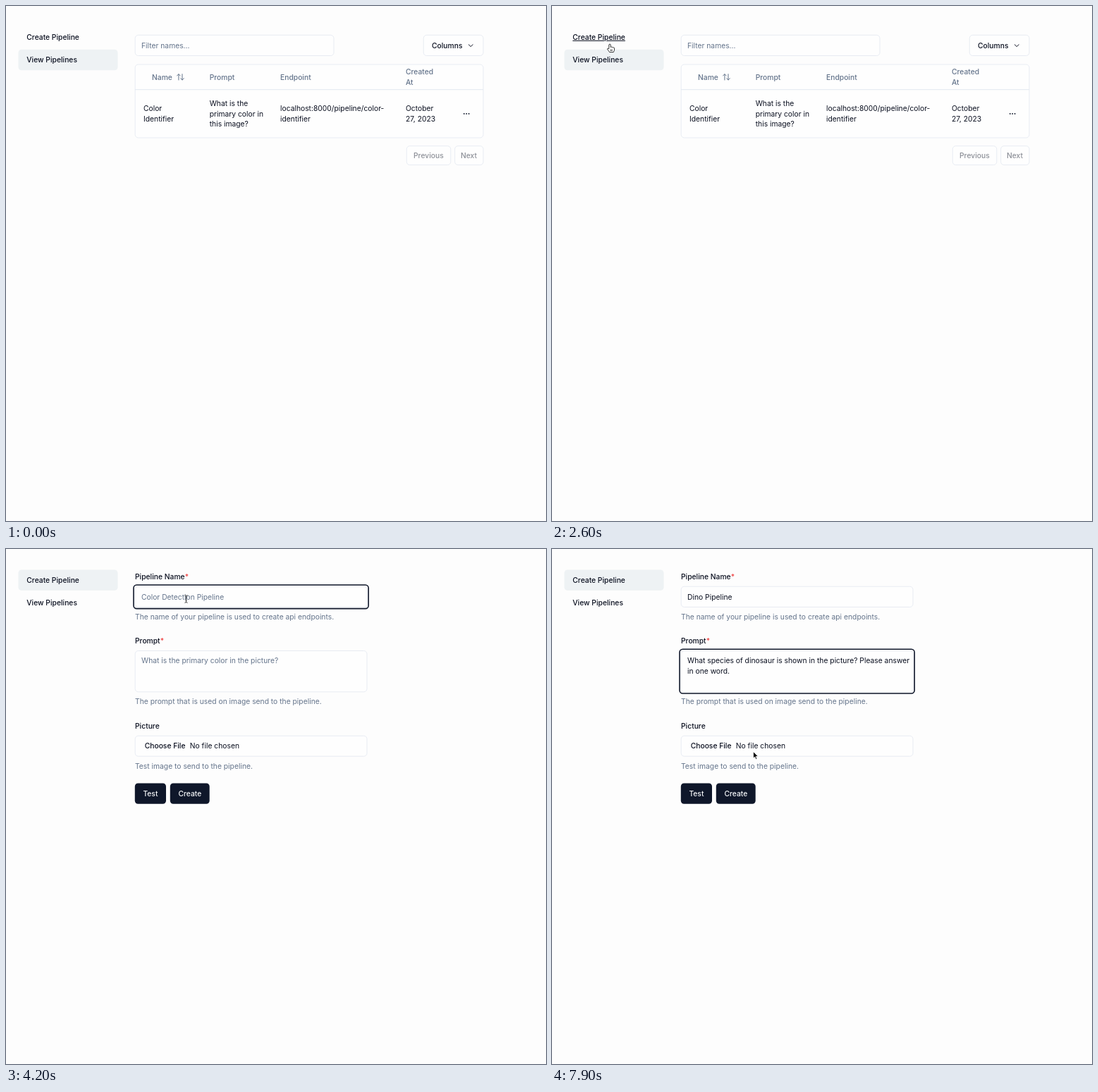
Animation, 766 px wide and 731 px high, one loop 8000 ms. Source, as an HTML page:

```html
<!DOCTYPE html>
<html lang="en">
<head>
<meta charset="utf-8">
<title>Pipelines</title>
<style>
html, body { margin: 0; width: 100%; height: 100%; overflow: hidden; background: #fdfdfd; }
svg { display: block; width: 766px; height: 731px; }
text { font: 400 10.3px Inter, sans-serif; fill: #0b1020; white-space: pre; }
.medium { font-weight: 500; }
.muted { fill: #64748b; }
.faded { fill: #8d9098; }
.light { fill: #f8fafc; }
.star { fill: #ef4444; }
.box { fill: #fefefe; stroke: #e2e8f0; stroke-width: .8; }
.dark { fill: #0f172a; }
.active { fill: #eef2f4; }
.ring { fill: none; stroke: #0f172a; stroke-width: 1.6; }
.icon { fill: none; stroke-width: 1; stroke-linecap: round; stroke-linejoin: round; }
</style>
</head>
<body>
<svg viewBox="0 0 766 731">
  <g id="nav"></g>
  <g id="list"></g>
  <g id="form"></g>
  <path id="caret" stroke="#0b1020" stroke-width=".9"/>
  <g id="cursor">
    <path id="arrow" d="M0 0V9.6L2.2 7.6L3.7 11L5.4 10.3L3.9 7H6.9Z" fill="#111" stroke="#fff" stroke-width=".8"/>
    <path id="hand" d="M-1.2 .8Q0 -.8 1.2 .8V4.4Q2.4 3.4 3.2 4.7Q4.4 3.9 5.1 5.1Q6.4 4.6 6.5 6.2V8Q6.4 9.6 5.2 11.6H-.4Q-1.6 9.5 -3.6 7.2Q-3.7 5.6 -1.2 6.6ZM1.4 7.6V10M3.1 7.6V10" fill="#fff" stroke="#222" stroke-width=".9" stroke-linejoin="round"/>
    <path id="beam" d="M-2 -5.3Q0 -5.3 0 -4Q0 -5.3 2 -5.3M0 -4V4M-2 5.3Q0 5.3 0 4Q0 5.3 2 5.3M-1 1.8H1" fill="none" stroke="#333" stroke-width=".9"/>
  </g>
</svg>
<script>
const NS = 'http://www.w3.org/2000/svg';
const $ = id => document.getElementById(id);
let layer;

function add(tag, attrs) {
  const el = document.createElementNS(NS, tag);
  for (const key in attrs) el.setAttribute(key, attrs[key]);
  return layer.appendChild(el);
}
// Text is placed by the middle of its capitals.
function label(x, mid, str, cls = '') {
  const el = add('text', { x, y: mid + 3.7, class: cls });
  el.textContent = str;
  return el;
}
const lines = (x, mid, rows, cls) => rows.forEach((row, i) => label(x, mid + i * 14.7, row, cls));
const box = (x, y, right, bottom, cls = 'box') =>
  add('rect', { x, y, width: right - x, height: bottom - y, rx: 4.4, class: cls });
const icon = (d, stroke) => add('path', { d, stroke, class: 'icon' });
const show = (el, on) => el.setAttribute('visibility', on ? 'visible' : 'hidden');

layer = $('nav');
const navItems = [['Create Pipeline', 29.4], ['View Pipelines', 61.8]].map(([name, y]) => {
  const bg = box(17.5, y, 158.5, y + 29.4, 'active');
  return { y, bg, text: label(29.3, y + 14.7, name, 'medium') };
});

layer = $('list');
box(183.2, 41.3, 465, 70.5);
label(192, 56, 'Filter names...', 'muted');
box(592.3, 41.3, 677, 70.5);
label(604, 56, 'Columns', 'medium');
icon('M656.3 54.8L659.2 57.6L662.1 54.8', '#0b1020');
box(183.2, 83, 677, 187);
icon('M183.5 118.7H676.7', '#e2e8f0');
label(207, 101, 'Name', 'medium muted');
icon('M242.6 99L244.9 96.7L247.2 99M244.9 96.7V105M247.8 102.7L250 105L252.2 102.7M250 105V96.7', '#64748b');
label(288.7, 101, 'Prompt', 'medium muted');
label(389, 101, 'Endpoint', 'medium muted');
lines(567, 93.5, ['Created', 'At'], 'medium muted');
lines(195, 145.5, ['Color', 'Identifier']);
lines(288.7, 138.2, ['What is the', 'primary color in', 'this image?']);
lines(389, 145.5, ['localhost:8000/pipeline/color-', 'identifier']);
lines(567, 145.5, ['October', '27, 2023']);
for (const cx of [649.8, 653.2, 656.6]) add('circle', { cx, cy: 152.9, r: .95, class: 'dark' });
box(568.3, 198.7, 630.8, 225.6);
label(578, 212.2, 'Previous', 'medium faded');
box(636.7, 198.7, 677, 225.6);
label(645, 212.2, 'Next', 'medium faded');

layer = $('form');
function field(name, mid, top, bottom, help, required) {
  const title = label(183, mid, name, 'medium');
  if (required) {
    const star = add('tspan', { class: 'star' });
    star.textContent = '*';
    title.append(star);
  }
  box(183.2, top, 512, bottom);
  label(183, bottom + 13.6, help, 'muted');
  return box(181, top - 2.2, 514.2, bottom + 2.2, 'ring');
}
const nameRing = field('Pipeline Name', 39.2, 53.2, 82.4, 'The name of your pipeline is used to create api endpoints.', true);
const promptRing = field('Prompt', 130.2, 144.5, 202.8, 'The prompt that is used on image send to the pipeline.', true);
show(field('Picture', 251, 265.2, 294.2, 'Test image to send to the pipeline.'), false);
label(196.7, 279.7, 'Choose File', 'medium');
label(260.8, 279.7, 'No file chosen');
box(182.8, 332.5, 227, 361.7, 'dark');
label(194.4, 347.1, 'Test', 'medium light');
box(232.8, 332.5, 288.7, 361.7, 'dark');
label(244.4, 347.1, 'Create', 'medium light');
const nameText = label(192, 68, '');
const promptText = label(192, 158.3, '');
const promptMore = label(192, 173, '');

const LOOP = 8000, SWITCH = 2800, NAME_FOCUS = 3900, PROMPT_FOCUS = 7100, PASTE = 7400;
const NAME = 'Dino Pipeline';
const PROMPT = ['What species of dinosaur is shown in the picture? Please answer', 'in one word.'];
// [time, letters typed]
const typing = [[0, 0], [4500, 1], [4700, 2], [4800, 3], [4900, 4], [5000, 5], [5300, 6],
  [5600, 8], [5700, 10], [5900, 12], [6100, 13]];
// [time, x, y] of the pointer
const path = [[1400, 288, 420], [1500, 268.6, 263.5], [1700, 235, 225], [2100, 110, 78], [2400, 82, 54],
  [3000, 82, 54], [3500, 248, 71], [3700, 255.5, 71], [6400, 255.5, 71], [6900, 279, 172],
  [7000, 279.3, 175], [7500, 279.3, 175], [7900, 285.5, 287.5]];
const caretOff = [[4200, 4500], [6500, 6900], [7900, 8000]];
const within = (v, a, b) => v >= a && v < b;

function pointerAt(t) {
  const i = path.findIndex(p => p[0] > t);
  if (i < 0) return path[path.length - 1].slice(1);
  const [t0, x0, y0] = path[Math.max(i - 1, 0)], [t1, x1, y1] = path[i];
  const k = Math.max(0, (t - t0) / (t1 - t0));
  return [x0 + (x1 - x0) * k, y0 + (y1 - y0) * k];
}

function draw(t) {
  const form = t >= SWITCH;
  show($('list'), !form);
  show($('form'), form);

  const [x, y] = pointerAt(t);
  const visible = t >= 1400 && !within(t, 4500, 6400);
  let overNav = false;
  navItems.forEach((item, i) => {
    const active = form === (i === 0);
    const hover = visible && within(x, 17.5, 158.5) && within(y, item.y, item.y + 29.4);
    overNav ||= hover;
    show(item.bg, active);
    item.text.style.textDecoration = hover && !active ? 'underline' : 'none';
  });
  const overField = form && within(x, 183, 512) && within(y, 53, 222);
  $('cursor').setAttribute('transform', `translate(${x} ${y})`);
  show($('hand'), visible && overNav);
  show($('beam'), visible && overField);
  show($('arrow'), visible && !overNav && !overField);

  const inName = within(t, NAME_FOCUS, PROMPT_FOCUS), inPrompt = t >= PROMPT_FOCUS;
  const pasted = t >= PASTE;
  const typed = NAME.slice(0, typing.filter(s => s[0] <= t).pop()[1]);
  nameText.textContent = typed || 'Color Detection Pipeline';
  nameText.classList.toggle('muted', !typed);
  promptText.textContent = pasted ? PROMPT[0] : 'What is the primary color in the picture?';
  promptText.classList.toggle('muted', !pasted);
  promptMore.textContent = pasted ? PROMPT[1] : '';
  show(nameRing, inName);
  show(promptRing, inPrompt);

  const line = inName ? nameText : promptMore;
  const filled = inName ? typed : pasted;
  const cx = 192.4 + (filled ? line.getComputedTextLength() : 0);
  const cy = inName ? 68 : pasted ? 173 : 158.3;
  $('caret').setAttribute('d', `M${cx} ${cy - 6}V${cy + 6}`);
  show($('caret'), (inName || inPrompt) && !caretOff.some(([a, b]) => within(t, a, b)));
}

const start = performance.now();
function tick() {
  const t = (performance.now() - start) % LOOP;
  draw(Math.floor(t / 100) * 100);
  requestAnimationFrame(tick);
}
tick();
</script>
</body>
</html>
```
